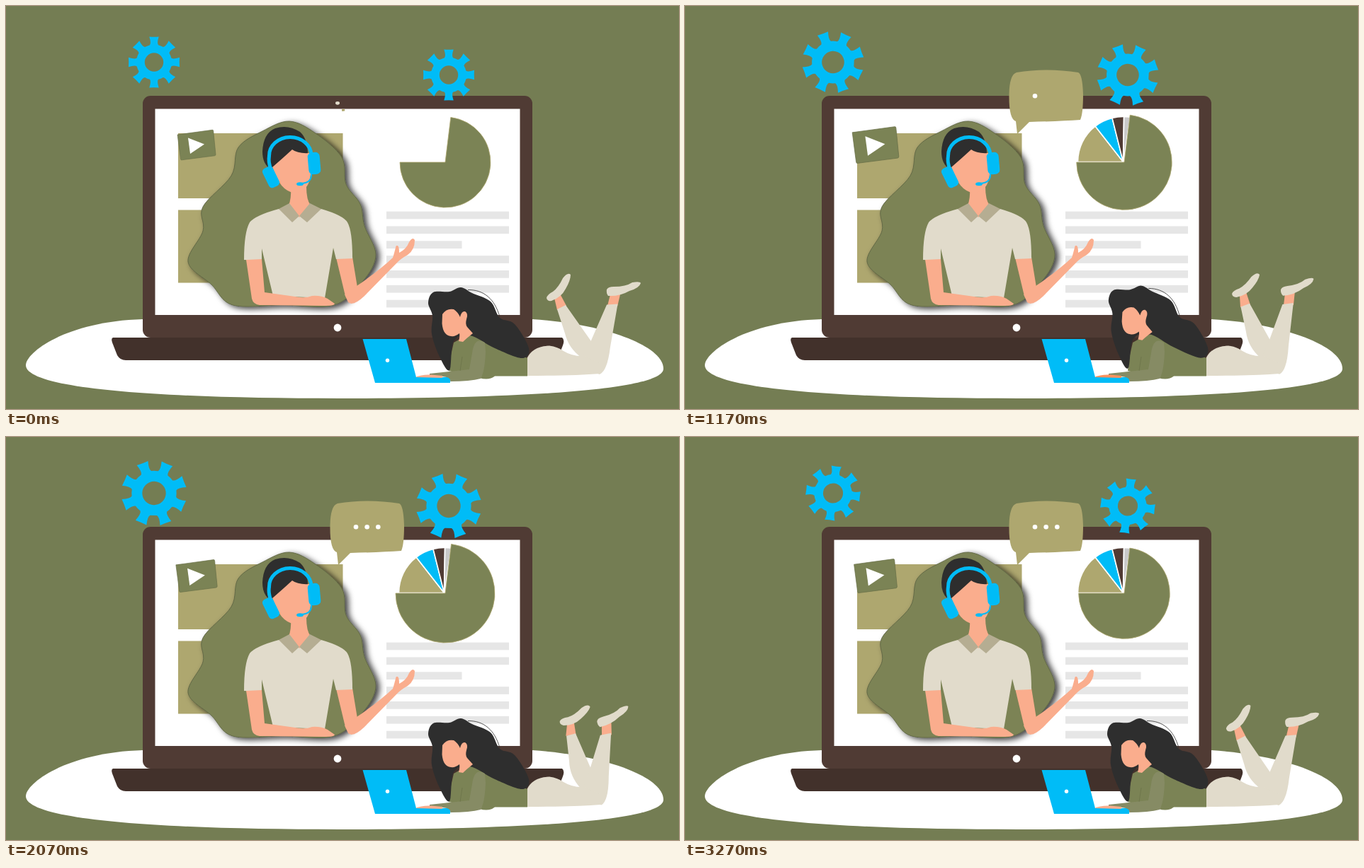
An HTML page that plays this animation: 950 px wide and 570 px high, repeating every 3.3 s.

```html
<!DOCTYPE html>
<html lang="en">
<head>
<meta charset="utf-8">
<title>Online class</title>
<style>
html, body { margin: 0; width: 100%; height: 100%; overflow: hidden; background: #747d53; }
svg { display: block; width: 100vw; height: 100vh; }
.olive { fill: #7b8355; }
.khaki { fill: #aea76f; }
.skin { fill: #faad8d; }
.cream { fill: #e1dbcb; }
.dark { fill: #2e2e2e; }
.blue { fill: #00bcf7; }
.white { fill: #fff; }
</style>
</head>
<body>
<svg viewBox="0 0 950 570">
  <defs>
    <filter id="shade" x="-10%" y="-10%" width="120%" height="120%">
      <feDropShadow dx="5" dy="3" stdDeviation="4" flood-color="#000" flood-opacity=".75"/>
    </filter>
  </defs>
  <rect width="950" height="570" fill="#747d53"/>
  <path class="white" d="M28 508C28 490 85 446 193 443H743C850 450 928 482 928 513C928 545 710 555 470 555C230 555 28 543 28 508Z"/>

  <!-- laptop -->
  <rect x="193" y="127" width="550" height="342" rx="11" fill="#503b34"/>
  <path d="M151 469H785Q789 472 786 480L781 493Q777 501 768 501H169Q161 501 157 494L150 476Q148 470 151 469Z" fill="#42312b"/>
  <rect class="white" x="210.5" y="145.5" width="515" height="291.5"/>
  <ellipse class="cream" cx="468" cy="137.3" rx="3" ry="2.4"/>
  <circle class="white" cx="468" cy="455" r="5.4"/>

  <!-- screen -->
  <rect class="khaki" x="243" y="180" width="232.5" height="92"/>
  <rect class="khaki" x="243" y="288.5" width="232.5" height="103"/>
  <g id="lines" fill="#e6e6e6"></g>
  <g id="slices" stroke="#fff" stroke-width="1.6"></g>
  <path id="pie" class="olive" stroke="#aea76f" stroke-width=".8"/>
  <path id="blob" class="olive" stroke="#5a6040" stroke-width=".8" filter="url(#shade)"/>
  <g id="play">
    <path class="olive" stroke="#666d47" stroke-width=".6" d="M242 182L291 175.3Q292.5 175 292.7 176.5L296 210Q296 211.5 294.5 211.8L248 217.8Q246.7 218 246.5 216.5Z"/>
    <path class="white" d="M257 186.5L280 195.5L260 209Z"/>
  </g>

  <!-- teacher -->
  <path class="skin" d="M466 356L489 355L496 398L488 421Q481 418 478 406Z"/>
  <path id="forearm" class="skin" d="M478 408L495 396Q527 374 546 356Q548 350 550.5 339.5Q555 336 555 349Q565 344 569 334Q574 326 577 331Q577 345 567 352Q558 357 553 362L505 411Q490 425 483 419Z"/>
  <path class="cream" d="M385 287L414 296L445 287Q476 296 482 306Q489 318 489 357L466 358L462 342L450 413L377 410L361 343V360L336 359Q336 320 344 306Q352 296 385 287Z"/>
  <path class="skin" d="M339 359L361 358L365 405L408 411Q422 414 432 410Q444 409 454 414L464 421Q464 424 452 424L358 423Q349 422 347 414Z"/>
  <path class="skin" d="M402 256H424Q424 274 430 282L414 299L399 282Q403 272 402 256Z"/>
  <path fill="#b5ad92" d="M400 279L385 287L404 306L414 297ZM429 279L445 287L425 306L414 297Z"/>
  <g id="head">
    <path class="dark" d="M374 231Q362 224 362 206Q363 180 380 173Q398 167 415 178Q426 188 426 210L405 216Z"/>
    <path class="skin" d="M376 228Q391 215 404 203Q412 209 428 208L430 238Q428 262 408 265Q394 262 387 251Q380 240 376 228Z"/>
    <path d="M374 231Q370 221 371.500 212A29.700 26 0 0 1 431 211" fill="none" stroke="#00bcf7" stroke-width="5"/>
    <rect class="blue" x="366" y="227" width="16" height="30" rx="5" transform="rotate(-26 374 242)"/>
    <rect class="blue" x="426.500" y="207" width="17" height="31" rx="6" transform="rotate(-5 435 222)"/>
    <path d="M431 237Q432 250 417 251" fill="none" stroke="#00bcf7" stroke-width="2"/>
    <ellipse class="blue" cx="415" cy="251.700" rx="5" ry="2.500"/>
  </g>

  <path id="bubble" class="khaki" d="M468 94Q510 87 555 94Q561 96 562 125Q562 152 558 161Q530 163 486 164L469 181L467 163Q457 160 457.500 125Q458 97 468 94Z"/>
  <g id="dots" class="white"></g>
  <path id="gearA" class="blue"/>
  <path id="gearB" class="blue"/>

  <!-- student -->
  <g id="legL">
    <g id="footL">
      <path class="skin" d="M782 407L791 424L778 430L774 413Z"/>
      <path class="cream" d="M763 413Q764 408 772 404Q780 398 786 385Q793 376 797 380Q797 388 790 400Q784 412 770 417Q764 418 763 413Z"/>
    </g>
    <path class="cream" d="M778 429L790 423L828 477L838 505L812 497Q794 484 789 463Z"/>
  </g>
  <g id="legR">
    <g id="footR">
      <path class="skin" d="M853 408H867L863 425L849 424Z"/>
      <path class="cream" d="M848 401Q850 397 858 397Q875 397 884 391Q895 389 896 392Q894 399 880 403Q866 411 850 410Q847 406 848 401Z"/>
    </g>
    <path class="cream" d="M848 422.500L863.500 421.500L853 482Q849 516 838 521L808 510Q816 492 826 473Z"/>
  </g>
  <path class="cream" d="M735 499Q743 481 767 480.500Q779 482 787 488Q800 496 816 495L838 505L839 520Q800 523 735 523Z"/>
  <path class="olive" d="M632 476Q645 468 664 462L702 484L736 498V523.500H690Q682 530 668 526L625 516Q627 495 632 476Z"/>
  <g id="girl">
    <path id="hair" class="dark"/>
    <path d="M652 401.500C674 401 690 414 697 440" fill="none" stroke="#2e2e2e" stroke-width=".8"/>
    <path class="skin" d="M616 436Q622 427 632 429Q638 433 641 440Q643 431 648 432Q653 435 650 443Q648 450 651 454L659 463Q650 470 645 475L639 474Q641 467 640 463Q634 468 628 467Q617 466 615.500 449Z"/>
  </g>
  <path class="blue" d="M503.500 471H565L579 525H627V533H521Z"/>
  <circle class="white" cx="538.500" cy="501.300" r="2.700"/>
  <path fill="#868b64" d="M676 476Q661 467 658 491L654 514L598 520V522.500L616 524Q629 525 627 531Q655 531 670 527Q676 517 677 489Z"/>
  <path id="hand" d="M578 525Q586 521 600 521.500L616 523V526Z"/>
  <path d="M644 496L641 516" stroke="#6c7449" stroke-width=".8"/>
</svg>
<script>
const LOOP = 3300, STEP = 30, SPIN = 3655;
const $ = id => document.getElementById(id);
const set = (el, attrs) => { for (const k in attrs) el.setAttribute(k, attrs[k]); return el; };
const add = (parent, tag, attrs) =>
  parent.appendChild(set(document.createElementNS('http://www.w3.org/2000/svg', tag), attrs));

const ramp = (t, from, to) => Math.max(0, Math.min(1, (t - from) / (to - from)));
const cubic = u => u < .5 ? 4 * u ** 3 : 1 - (2 - 2 * u) ** 3 / 2;
const wave = (t, period) => 1 - Math.abs((t % period) / period * 2 - 1);
const hump = (t, end) => Math.sin(Math.PI * ramp(t, 0, end));

// Closed smooth curve through "x,y x,y ..."
function smooth(text) {
  const p = text.split(' ').map(s => s.split(',').map(Number)), n = p.length;
  let d = `M${p[0]}`;
  for (let i = 0; i < n; i++) {
    const a = p[(i + n - 1) % n], b = p[i], c = p[(i + 1) % n], e = p[(i + 2) % n];
    const c1 = b.map((v, k) => v + (c[k] - a[k]) / 6);
    const c2 = c.map((v, k) => v - (e[k] - b[k]) / 6);
    d += `C${c1} ${c2} ${c}`;
  }
  return d + 'Z';
}

function sector(x, y, r, from, to) {
  const at = deg => {
    const a = deg * Math.PI / 180;
    return `${x + r * Math.cos(a)} ${y + r * Math.sin(a)}`;
  };
  return `M${x} ${y}L${at(from)}A${r} ${r} 0 ${to - from > 180 ? 1 : 0} 1 ${at(to)}Z`;
}

// Eight flared teeth joined by arcs of the body, with a round hole
function gearPath() {
  let d = '';
  for (let i = 0; i < 8; i++) {
    const a = i * Math.PI / 4, c = Math.cos(a), s = Math.sin(a);
    const q = (x, y) => `${(x * c - y * s).toFixed(2)} ${(x * s + y * c).toFixed(2)}`;
    d += `${i ? 'A25 25 0 0 1 ' : 'M'}${q(-6, -24.3)}Q${q(-3.8, -27)} ${q(-6.7, -36)}`
      + `Q${q(0, -35.5)} ${q(6.7, -36)}Q${q(3.8, -27)} ${q(6, -24.3)}`;
  }
  return d + 'ZM13.2 0A13.2 13.2 0 1 0 -13.2 0A13.2 13.2 0 1 0 13.2 0Z';
}

const scaleAt = (x, y, s) => `translate(${x} ${y}) scale(${s}) translate(${-x} ${-y})`;
const turn = (id, deg, x, y) => set($(id), { transform: `rotate(${deg} ${x} ${y})` });

set($('blob'), { d: smooth('400,163 437,180 474,214 480,252 500,280 506,311 522,352 504,389 '
  + '463,423 390,423 320,423 290,394 257,362 278,318 278,284 318,240 328,200 362,177') });
set($('hair'), { d: smooth('596,420 603,405 626,404 642,398 658,406 684,418 697,441 718,450 738,484 '
  + '728,498 690,484 655,466 632,474 626,515 612,496 601,464 602,438') });

for (let i = 0; i < 7; i++)
  add($('lines'), 'rect', { x: 537, y: 290.6 + i * 20.85, width: i % 4 === 2 ? 106.5 : 173, height: 10.7 });

const slices = [[180, 232, '#aea76f'], [232, 256, '#00bcf7'], [256, 271, '#503b34'], [271, 279, '#c9c9c9']]
  .map(([a, b, fill]) => add($('slices'), 'path', { d: sector(618.5, 220.5, 64, a, b), fill }));
const dots = [0, 1, 2].map(i => add($('dots'), 'circle', { cx: 494 + i * 15.65, cy: 127.2 }));
const gears = [['gearA', 209, 79.5], ['gearB', 625, 97.5]];
for (const [id] of gears) set($(id), { d: gearPath(), 'fill-rule': 'evenodd' });

function draw(t) {
  const swell = wave(t, SPIN);
  for (const [id, x, y] of gears)
    set($(id), { transform: `translate(${x} ${y}) rotate(${t * 360 / SPIN}) scale(${1 + .305 * swell})` });
  set($('pie'), { d: sector(620, 221, 64 + 8 * swell ** 2, -83, 180) });

  set($('play'), { transform: scaleAt(269, 196.5, 1 + .3 * wave(t, SPIN / 2)) });
  set($('bubble'), { transform: scaleAt(474.7, 148, .04 + .96 * cubic(ramp(t, 50, 1050))) });
  dots.forEach((dot, i) => set(dot, { r: 3.3 * ramp(t, 1060 + i * 200, 1150 + i * 200) }));

  slices.forEach((slice, i) => {
    const grow = ramp(t, 450 + i * 150, 600 + i * 150);
    set(slice, { transform: scaleAt(618.5, 220.5, grow), visibility: grow ? 'visible' : 'hidden' });
  });

  const sway = hump(t, 850);
  turn('forearm', -5.5 * sway, 488, 410);
  turn('head', -1.4 * sway, 413, 270);

  // Legs swing from rest into a steady beat
  const kick = Math.min(.043 * t, 27 * wave(t + 355, SPIN / 2));
  turn('legL', .66 * kick, 815, 490);
  turn('footL', .42 * kick, 784, 424);
  turn('legR', -.38 * kick, 836, 500);
  turn('footR', -.45 * kick, 857, 418);

  const nod = hump(t, 1450);
  turn('girl', 2.5 * nod, 738, 492);
  set($('hand'), { fill: nod > .2 ? '#ff925f' : '#faad8d' });
}

const start = performance.now();
function tick() {
  const t = (performance.now() - start) % LOOP;
  draw(Math.floor(t / STEP) * STEP);
  requestAnimationFrame(tick);
}
tick();
</script>
</body>
</html>
```
